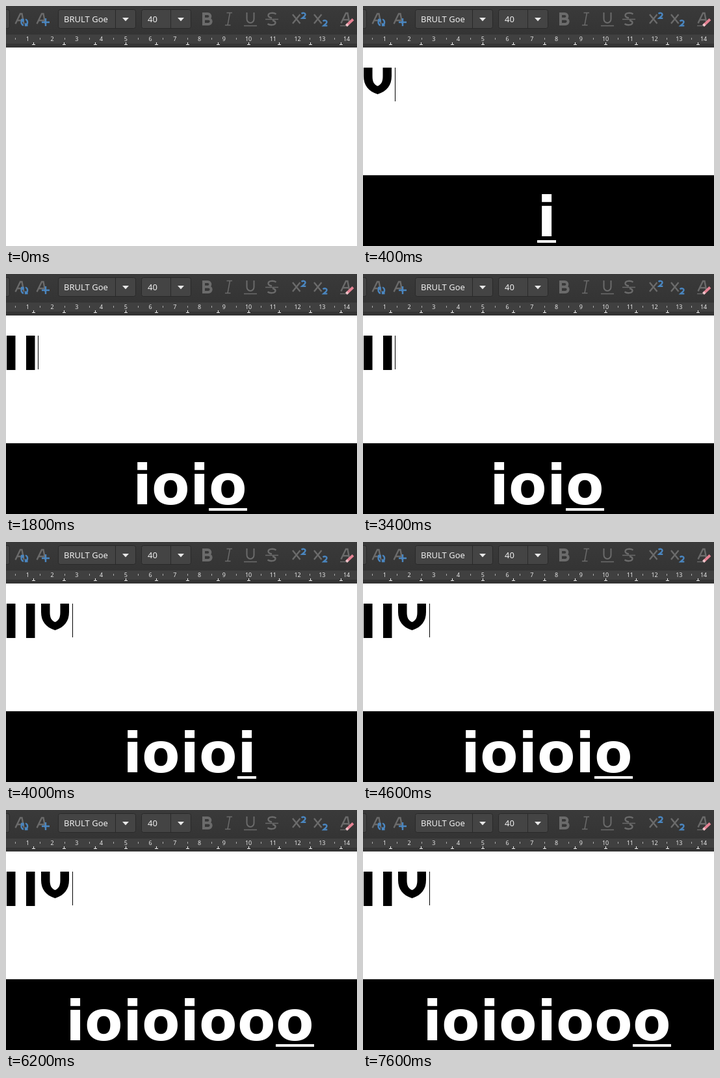
Animation of 540 by 370 pixels, one loop 8000 ms. Source, as an HTML page:

```html
<!DOCTYPE html>
<html lang="en">
<head>
<meta charset="utf-8">
<title>Typing demo</title>
<style>
  html, body { margin: 0; width: 100%; height: 100%; overflow: hidden; background: #fff; }
  svg { display: block; }
  .ui { font: 13px "Noto Sans", "Open Sans", sans-serif; fill: #eee; }
  .num { font: 9px "Noto Sans", "Open Sans", sans-serif; fill: #e6e6e6; text-anchor: middle; }
  .big { font: bold 85.33px "DejaVu Sans", sans-serif; fill: #fff; }
  .icon { fill: none; stroke: #6b6b6b; stroke-width: 2.4; }
  .blue { stroke: #4a86c0; }
  .thin { stroke-width: 1.3; }
  .crisp { shape-rendering: crispEdges; }
</style>
</head>
<body>
<svg width="540" height="370" viewBox="0 0 540 370">
  <defs>
    <linearGradient id="bar" x2="0" y2="1">
      <stop stop-color="#3a3a3a"/><stop offset="1" stop-color="#343434"/>
    </linearGradient>
    <path id="A" class="icon" d="M14.5 27.5L22 12H24.5L27.5 27.5M17.5 22.3H26"/>
    <path id="X" class="icon" d="M0 0L11.5 14M11.5 0L0 14"/>
    <path id="two" class="icon blue" d="M.5 1.8C3 0 6.5 .5 6.5 3.2C6.5 5.2 4 6.5 1.5 8.9H7.3" stroke-width="2"/>
    <path id="arrow" d="M-5 18H5L0 23.5Z" fill="#e8e8e8"/>
    <path id="bars" d="M1 95H14.5V148H1ZM31 95H44.5V148H31Z"/>
    <path id="cup" d="M1 95H14.5V108C14.5 117 17 121 22.5 123.5C28 121 30.5 117 30.5 108V95H44V108C44 122 37 131.500 22.500 136C8 131.500 1 122 1 108Z"/>
  </defs>

  <rect width="540" height="43" fill="url(#bar)"/>
  <rect y="43" width="540" height="21" fill="#343434"/>
  <rect y="44" width="540" height="14" fill="#404040"/>

  <g fill="#444" stroke="#292929">
    <rect x="-20.500" y="5.500" width="26" height="29" rx="3"/>
    <rect x="80.500" y="5.500" width="119" height="29" rx="3"/>
    <rect x="208.500" y="5.500" width="76" height="29" rx="3"/>
    <path d="M168.500 6V34M253.500 6V34"/>
  </g>
  <use href="#arrow" x="184"/>
  <use href="#arrow" x="269"/>
  <text class="ui" x="89" y="25">BRULT Goe</text>
  <text class="ui" x="218" y="25">40</text>

  <use href="#A"/>
  <path class="icon blue" d="M24.500 22A5 5 0 0 0 27 29.800M30 20.500A5 5 0 0 1 30.500 29.500M23 21H26.500V24.500M33.500 30H30V26.500" stroke-width="2"/>
  <use href="#A" x="33"/>
  <path class="icon blue" d="M55 25H67M61 19V31"/>

  <path class="icon" stroke-width="4" style="stroke-width:4" d="M304 12H310.500A3.800 3.800 0 0 1 310.500 19.700H304ZM304 19.700H311.500A4.100 4.100 0 0 1 311.500 28H304Z"/>
  <path class="icon" style="stroke-width:1.500" d="M339.500 10.500H348M337 29.500H345.500M344.500 10.500L341 29.500"/>
  <path class="icon" style="stroke-width:2" d="M370.500 10V20A5.500 6 0 0 0 381.500 20V10"/>
  <path class="icon thin" d="M366 30.500H386M399 20.500H419"/>
  <path class="icon" d="M415.500 12.500C412 10 403.500 10 403.500 14.500C403.500 17 406 18 409 18.500M410 22C413 23 414.500 24 414.500 25.500C414.500 30 406 30 402.500 27.500"/>
  <use href="#X" x="441" y="13"/>
  <use href="#two" x="454" y="10"/>
  <use href="#X" x="474" y="13"/>
  <use href="#two" x="487" y="21.500"/>
  <use href="#A" x="501" y="-1"/>
  <path class="icon thin" d="M514 30.500H524"/>
  <path d="M525.500 28.500L534 20.500" stroke="#e58293" stroke-width="4"/>
  <path d="M523.500 30.500L526 28" stroke="#f2c4cb" stroke-width="4"/>

  <g id="ruler"></g>
  <g id="page">
    <use id="pair" href="#bars"/>
    <use id="bowl" href="#cup"/>
    <rect id="caret" class="crisp" y="95" width="1" height="52"/>
  </g>
  <g id="panel">
    <rect y="260" width="540" height="1" fill="#e4e4e4"/>
    <rect y="261" width="540" height="109"/>
    <text id="word" class="big" y="355"></text>
    <rect id="line" class="crisp" y="361" height="4" fill="#fff"/>
  </g>
</svg>
<script>
const $ = id => document.getElementById(id);
const show = (id, on) => $(id).setAttribute("visibility", on ? "visible" : "hidden");

let marks = "";
for (let n = 1; n <= 14; n++) {
  const x = 33.3 + 37.75 * (n - 1);
  marks += `<text class="num" x="${x}" y="54">${n}</text>
    <rect class="crisp" x="${Math.round(x - 19)}" y="49" width="1" height="3" fill="#aaa"/>`;
}
for (let i = 0; i < 11; i++) {
  const x = Math.round(42 + 47.3 * i);
  marks += `<path class="crisp" d="M${x} 56h1v3h2v1h-5v-1h2z" fill="#eee"/>`;
}
$("ruler").innerHTML = marks;

const LOOP = 8000, CENTER = 283;
const advance = { i: 29, o: 59 };
const typed = "ioioiooo";
const keyTimes = [400, 600, 1000, 1800, 4000, 4600, 5200, 6200];
const within = (t, a, b) => t >= a && t < b;
let shown = -1;

function setWord(count) {
  const letters = [...typed.slice(0, count)];
  const total = letters.reduce((sum, c) => sum + advance[c], 0);
  let x = Math.floor(CENTER - total / 2);
  const xs = letters.map(c => (x += advance[c]) - advance[c]);
  $("word").textContent = letters.join("");
  $("word").setAttribute("x", xs.join(" "));
  show("panel", count > 0);
  if (count) {
    $("line").setAttribute("x", xs[count - 1]);
    $("line").setAttribute("width", advance[letters[count - 1]]);
  }
}

function draw(t) {
  const count = keyTimes.filter(k => t >= k).length;
  if (count !== shown) setWord(shown = count);
  show("pair", t >= 1000);
  show("bowl", within(t, 200, 1000) || t >= 4000);
  $("bowl").setAttribute("x", t >= 4000 ? 53 : 0);
  $("caret").setAttribute("x", t >= 4000 ? 102 : 49);
  show("caret", t >= 200 && !within(t, 2800, 3400) && !within(t, 7200, 7600));
}

const start = performance.now();
function tick() {
  draw((performance.now() - start) % LOOP);
  requestAnimationFrame(tick);
}
tick();
</script>
</body>
</html>
```
